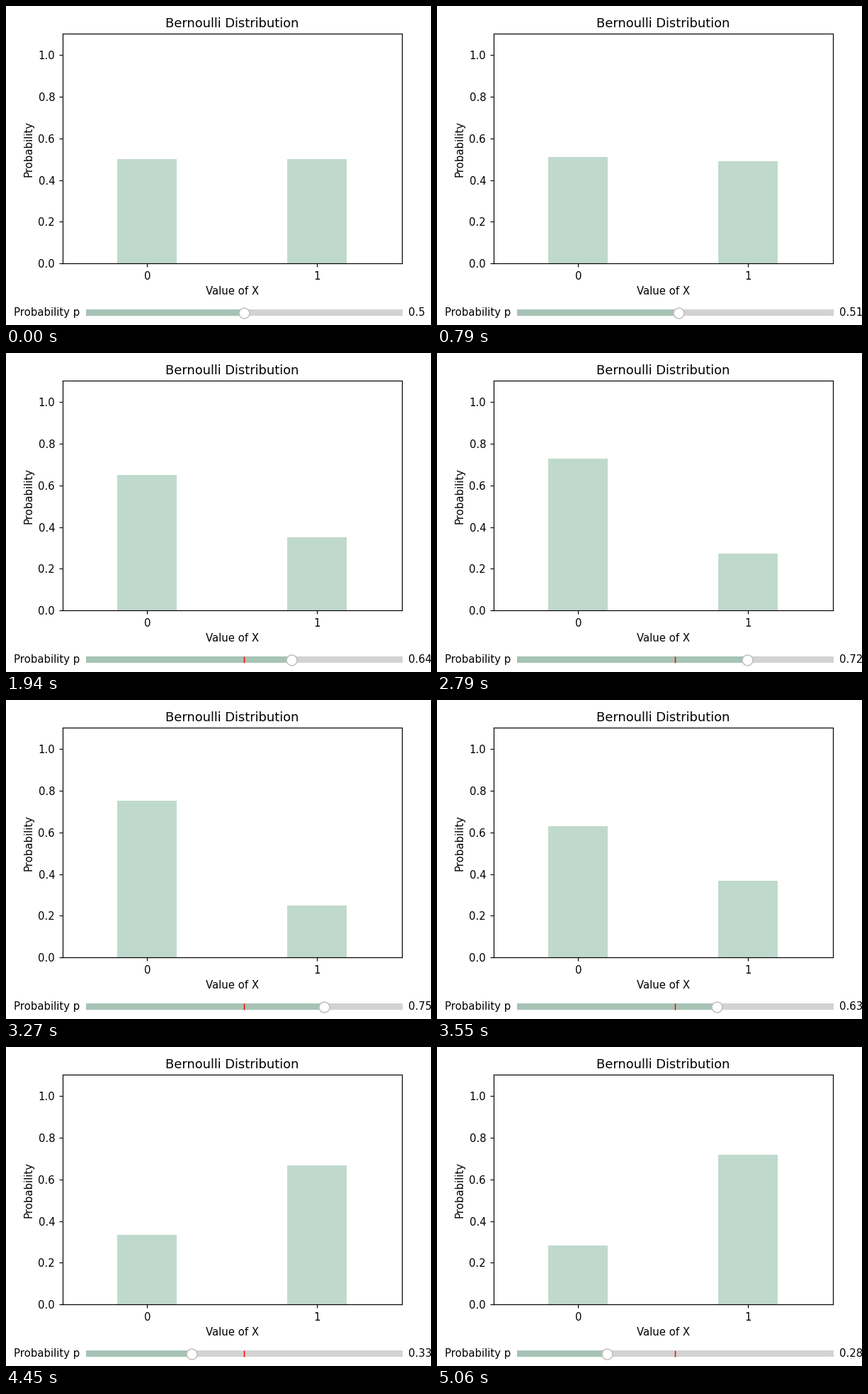
Animation of 600 by 450 pixels, one loop 5330 ms. Source, as a matplotlib script:

```python
import numpy as np
import matplotlib.pyplot as plt
from matplotlib.animation import FuncAnimation
from matplotlib.patches import Rectangle

W, H, DPI = 600, 450, 107
LOOP, TICK, REDRAW = 5330, 10, 60
P0 = 0.5
BAR, FILL = "#c0d9cd", "#a6c3b5"

# Turning points of the drag: time in ms and value of p
PATH = [(0, P0), (550, 0.501), (730, 0.505), (1330, 0.569), (1790, 0.6405),
        (1930, 0.649), (2790, 0.7275), (3030, 0.766), (3250, 0.752),
        (3550, 0.631), (4450, 0.334), (4850, 0.2815), (5050, 0.2835)]

# The plot refreshes at a steady pace while the handle is being dragged
DRAGS = [(0, 1), (550, 551), (730, 2400), (2550, 3060), (3250, 5060)]
TIMES = np.concatenate([np.arange(*drag, REDRAW) for drag in DRAGS])
VALUES = np.interp(TIMES, *zip(*PATH))


def add_axes(left, bottom, width, height):
    return fig.add_axes([left / W, bottom / H, width / W, height / H])


fig = plt.figure(figsize=(W / DPI, H / DPI), dpi=DPI, facecolor="white")

ax = add_axes(79.53, 86.6, 479.6, 324)
bars = ax.bar([0, 1], [1 - P0, P0], width=0.35, color=BAR)
ax.set(xlim=(-0.5, 1.5), ylim=(0, 1.1), xticks=[0, 1],
       yticks=np.arange(0, 1.1, 0.2), title="Bernoulli Distribution",
       xlabel="Value of X", ylabel="Probability")

sax = add_axes(113.1, 8.5, 446.4, 18)
sax.set(xlim=(0, 1), ylim=(0, 1))
sax.set_axis_off()
sax.add_patch(Rectangle((0, 0.25), 1, 0.5, facecolor="lightgrey"))
fill = sax.add_patch(Rectangle((0, 0.25), P0, 0.5, facecolor=FILL))
sax.axvline(P0, 0.25, 0.75, color="red", lw=1, solid_capstyle="butt")
handle, = sax.plot([P0], [0.5], "o", ms=10, mfc="white", mec="0.75",
                   clip_on=False)
sax.text(-0.02, 0.5, "Probability p", ha="right", va="center")
readout = sax.text(1.02, 0.5, "", ha="left", va="center")


def update(frame):
    p = VALUES[np.searchsorted(TIMES, frame * TICK, side="right") - 1]
    bars[0].set_height(p)
    bars[1].set_height(1 - p)
    fill.set_width(p)
    handle.set_xdata([p])
    readout.set_text(f"{p:.3f}".rstrip("0"))
    return [*bars, fill, handle, readout]


anim = FuncAnimation(fig, update, frames=LOOP // TICK, interval=TICK,
                     repeat=True, repeat_delay=0)
plt.show()
```
